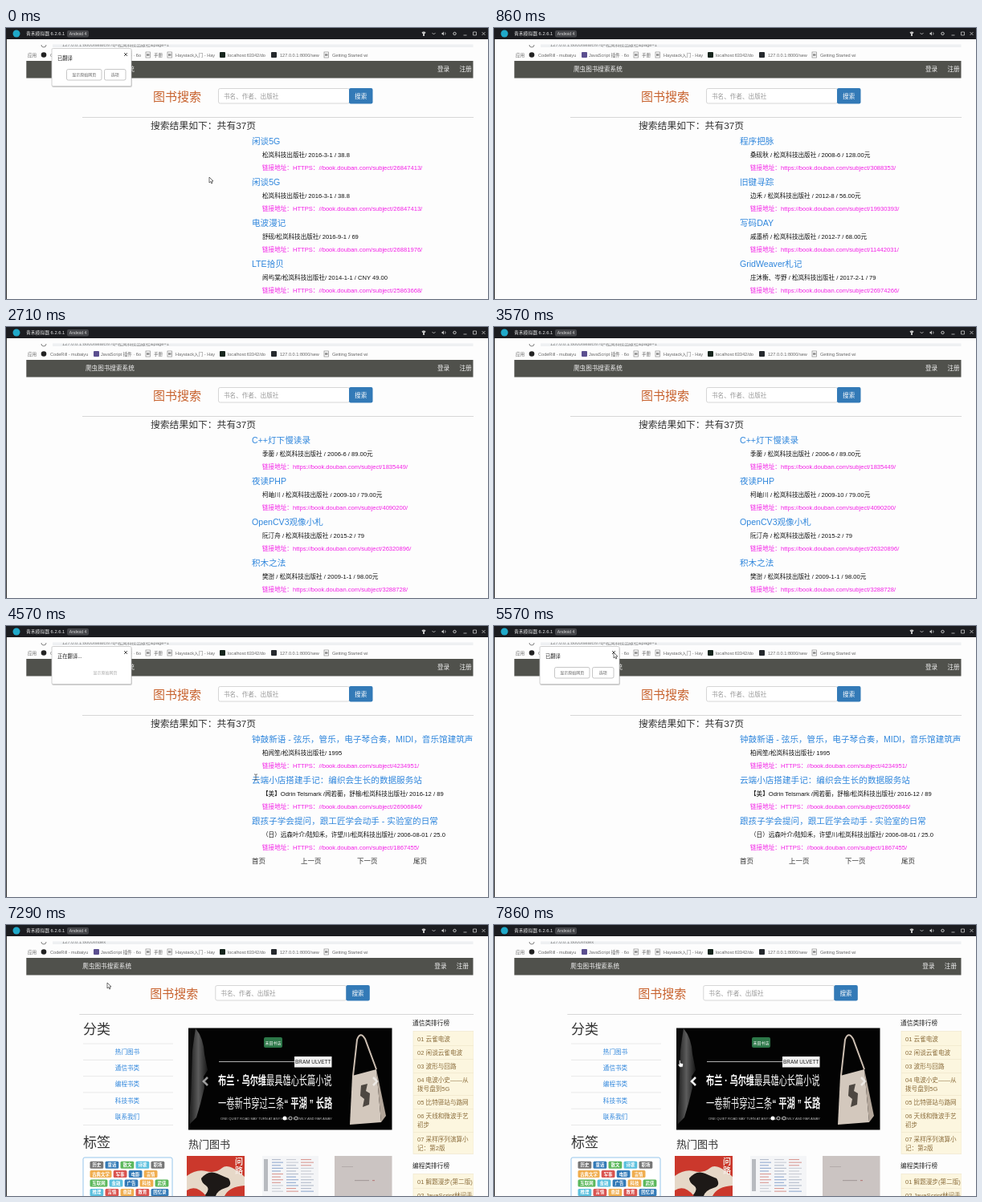
Recreate the animation shown at these times as an HTML page. Size 600 by 338 pixels, loop 8 s.

```html
<!DOCTYPE html>
<html lang="zh-CN">
<head>
<meta charset="utf-8">
<title>图书搜索</title>
<style>
html, body { margin: 0; width: 100%; height: 100%; overflow: hidden; background: #fff; }
svg { display: block; width: 100vw; height: 100vh; }
text { font-family: "Liberation Sans", "Noto Sans CJK SC", "Noto Sans CJK", sans-serif; white-space: pre; }
</style>
</head>
<body>
<svg id="stage" viewBox="0 0 600 338"></svg>
<script>
const PRESS = '松岚科技出版社';
const SITE = 'book.douban.com/subject/';
const NAV = '#50514c', BLUE = '#2f86dc', PINK = '#f31fe6', BROWN = '#8b6d3c';

// Text is placed by its vertical centre.
const text = (x, cy, s, size = 7.6, fill = '#222', more = '') =>
  `<text x="${x}" y="${(cy + size * 0.36).toFixed(2)}" font-size="${size}" fill="${fill}" ${more}>${s}</text>`;
const rect = (x, y, w, h, fill, more = '') =>
  `<rect x="${x}" y="${y}" width="${w}" height="${h}" fill="${fill}" ${more}/>`;
const path = (d, fill = 'none', more = '') => `<path d="${d}" fill="${fill}" ${more}/>`;
const line = (x1, x2, y, stroke = '#e4e4e4') => path(`M${x1} ${y}H${x2}`, 'none', `stroke="${stroke}" stroke-width=".8"`);
const group = (id, body, more = '') => `<g id="${id}" ${more}>${body}</g>`;
const middle = 'text-anchor="middle"';

function titleBar() {
  const icon = 'stroke="#c4c4c4" stroke-width=".8"';
  return rect(0, 0, 600, 14, '#1b1c20') +
    '<circle cx="13" cy="7" r="4.5" fill="#20a9c9"/>' +
    text(25, 7.2, '青禾模拟器 6.2.6.1', 5.8, '#e4e4e4') +
    rect(76, 3, 27, 8.5, '#45464a', 'rx="2"') + text(89.5, 7.3, 'Android 4', 5, '#dcdcdc', middle) +
    path('M517.500 5.500l1.500-1h2l1.500 1-.8 1.500h-.7v3h-2V7h-.7z', '#c4c4c4') +
    path('M530.5 6l2 2 2-2', 'none', icon) +
    path('M542.500 6h1l1.500-1.500v5l-1.500-1.500h-1z', '#c4c4c4') + path('M546.500 5.500q1.200 1.500 0 3', 'none', icon) +
    '<circle cx="558.500" cy="7" r="1.700" fill="none" stroke="#c4c4c4"/>' +
    path('M569.500 9h4M581.500 5h4v4h-4zM592.500 5l4 4M596.500 5l-4 4', 'none', icon);
}

function bookmarks() {
  const doc = x => rect(x, 30, 5.5, 7, '#fff', 'stroke="#888" stroke-width=".7"') +
    rect(x + 1, 32, 3.5, 3, '#9a9a9a');
  const square = (x, fill) => rect(x, 30, 7, 7, fill, 'rx="1"');
  const labels = [[27, '应用'], [55, 'CodeRill - mubaiyu'], [118, 'JavaScript 插件 · 6o'], [184, '手册'],
    [211, 'Haystack入门 - Hay'], [276, 'localhost:63342/do'], [341, '127.0.0.1:8000/sew'], [406, 'Getting Started wi']];
  return '<circle cx="47" cy="33.500" r="3.300" fill="#222"/>' + square(109, '#5b4f8f') +
    doc(174) + doc(201) + square(266, '#16251d') + square(330, '#25292d') + doc(396) +
    labels.map(([x, s]) => text(x, 34, s, 5.6, '#666')).join('');
}

// Address line, cut off along its upper edge.
const address = s => text(70, 20.8, s, 5.8, '#777', 'clip-path="url(#addressClip)"');

const header = () =>
  text(99, 51.3, '爬虫图书搜索系统', 7.6, '#f2f2f2', 'id="brand"') +
  text(537, 51.3, '登录', 7.6, '#f2f2f2') + text(564.5, 51.3, '注册', 7.6, '#f2f2f2') +
  text(183, 86, '图书搜索', 15, '#c8632f') +
  rect(264.5, 75.5, 163, 18.5, '#fff', 'stroke="#ccc" stroke-width=".8" rx="2"') +
  text(271, 85, '书名、作者、出版社', 7.6, '#999') +
  rect(427, 75, 29.5, 19.5, '#337ab7', 'rx="2"') + text(441.7, 85.3, '搜索', 7.6, '#fff', middle);

function results(id, scheme, books) {
  const rows = books.map(([name, info, num], i) => {
    const y = 141 + i * 51;
    return text(306, y, name, 10.6, BLUE) + text(319, y + 17.3, info.replace('@', PRESS), 7.6, '#111') +
      text(319, y + 33, `链接地址：${scheme}//${SITE}${num}/`, 7.6, PINK);
  });
  return group(id, address(`127.0.0.1:8000/search/?q=${PRESS}&amp;page=1`) +
    text(180, 122, '搜索结果如下：共有37页', 11.8, '#333') + rows.join('') +
    (books.length < 4 ? [[306, '首页'], [367, '上一页'], [437, '下一页'], [507, '尾页']]
      .map(([x, s]) => text(x, 293, s, 8.5, '#333')).join('') : ''), 'clip-path="url(#pageClip)"');
}

function bag() {
  return path('M432 188L437 143Q441 132 447 142L461 180', 'none', 'stroke="#cdbfb2" stroke-width="2"') +
    path('M431 188l30-8 6 66-39 3z', '#d3c8bd') + path('M461 180l12 58-6 8z', '#b3a69a') +
    path('M442 200l8-2-2 9 5 3-1 14-8 3 2-10-5-4z', '#4d4741');
}

function banner() {
  return rect(227, 128.5, 253.5, 127, '#030303') +
    path('M228 129h8q10 12 11 32l4 20-5 8 1 14-5 20-5 17-9 9z', 'url(#face)') +
    path('M227 129h9q-2 12-4 28l-2 60-3 30z', '#0b0b0b') +
    rect(321, 140, 23, 13, '#2c7748', 'rx="2"') + text(332.5, 146.7, '禾田书店', 5, '#fff', middle) +
    line(265, 359, 170.5, '#ddd') +
    rect(359, 164, 46.500, 13.500, '#f4f4f4') + text(382.2, 171, 'BRAM ULVETT', 6.4, '#222', middle) +
    // The slogan is set in tall, narrow letters.
    `<g transform="translate(264 0) scale(1 1.5)">` +
    text(0, 129, '布兰 · 乌尔维<tspan font-weight="400">最具雄心长篇小说</tspan>', 10.2, '#fff', 'font-weight="700"') +
    text(0, 148, '一卷新书穿过三条<tspan font-weight="700">“ 平湖 ” 长路</tspan>', 10.3, '#f4f4f4') + '</g>' +
    text(267, 241.5, 'ONE QUIET ROAD MAY TURN AT ANY HOUR, SLOWLY AND FAR AWAY', 4.2, '#bbb') +
    bag() +
    '<circle cx="347" cy="241" r="2.500" fill="#fff"/>' +
    [354, 361].map(x => `<circle cx="${x}" cy="241" r="2" fill="#111" stroke="#fff" stroke-width=".7"/>`).join('') +
    path('M251 190l-5 5 5 5', 'none', 'id="prev" stroke="#fff" stroke-width="2.600"') +
    path('M457 190l5 5-5 5', 'none', 'stroke="#fff" stroke-width="2.600" opacity=".6"');
}

function tags() {
  const [gray, blue, green, cyan, amber, red] = ['#777', '#337ab7', '#5cb85c', '#5bc0de', '#f0ad4e', '#d9534f'];
  const rows = [
    [['历史', gray], ['童话', blue], ['散文', green], ['诗歌', cyan], ['职场', gray]],
    [['古典文学', amber], ['军事', red], ['电影', blue], ['言情', amber]],
    [['互联网', green], ['金融', cyan], ['广告', blue], ['科技', amber], ['武侠', green]],
    [['推理', cyan], ['言情', red], ['悬疑', amber], ['教育', red], ['回忆录', blue]]];
  return rect(96, 290, 111, 60, '#fff', 'stroke="#8cc0ea" stroke-width=".9" rx="2"') +
    rows.map((row, r) => {
      let x = 104.500;
      const y = 294.700 + r * 11.4;
      return row.map(([s, fill]) => {
        const w = 6.6 + s.length * 5.1, at = x;
        x += w + 2.2;
        return rect(at, y, w, 9, fill, 'rx="1.5"') + text(at + w / 2, y + 4.5, s, 5.4, '#fff', middle + ' font-weight="700"');
      }).join('');
    }).join('');
}

function covers() {
  const notes = Array.from({ length: 36 }, (_, i) =>
    rect(331 + (i % 3) * 18, 292 + Math.floor(i / 3) * 3.6, 11 + (i * 7) % 6, 1.1,
      ['#b4bccb', '#c9ccd4', '#d99a94', '#93abd0'][(i * 5 + (i >> 2)) % 4])).join('');
  return rect(225, 288, 72, 50, '#cb382c') +
    path('M225 313q12-9 24-6t20-4 28 11v24h-72z', '#e6d8c8') +
    path('M243 316q9-11 20-6t14 6q6 9-4 12t-12 10h-14q8-9 2-13t-6-9z', '#1d1917') +
    path('M225 331q12-8 24 7h-24zM272 338q6-12 25-13v13z', '#cb382c') +
    ['问', '路'].map((s, i) => text(290, 295 + i * 11, s, 10, '#f3e9e2', middle + ' font-weight="700"')).join('') +
    rect(319, 288, 70, 50, '#f4f5f7') + rect(321, 292, 5, 40, '#8f939c', 'opacity=".6"') + notes +
    rect(409, 288, 71.500, 50, '#cbc4c2') + rect(418, 301, 14, 1, '#b3abaa') +
    rect(434, 318, 18, 1.2, '#a69d9c') + rect(456, 318, 3, 1.2, '#b7807f');
}

function ranking(title, y, h, items) {
  return text(506, y, title, 7.7, '#222') + rect(507, y + 10.500, 75, h, '#fcf6df', 'stroke="#efe7cd" stroke-width=".7"') +
    items.map(([dy, s, rule]) => (rule ? line(507, 582, y + dy - 8.500, '#f1e9cf') : '') +
      text(512, y + dy, s, 7.6, BROWN)).join('');
}

function home() {
  const cats = ['热门图书', '通信书类', '编程书类', '科技书类', '联系我们'];
  return group('home', address('127.0.0.1:8000/index') +
    text(96, 129.5, '分类', 17, '#333') + text(96, 271, '标签', 17, '#333') +
    cats.map((s, i) => line(96, 208, 148 + i * 20.3) + text(151, 158 + i * 20.3, s, 7.6, BLUE, middle)).join('') +
    line(96, 208, 249.5) + tags() + banner() + text(227, 273.5, '热门图书', 13, '#333') + covers() +
    ranking('通信类排行榜', 122, 153, [[20, '01 云雀电波'], [37, '02 闲谈云雀电波', 1], [54, '03 波形与回路', 1],
      [71, '04 电波小史——从', 1], [82, '拨号盘到5G'], [99, '05 比特驿站与路网', 1],
      [116, '06 天线和微波手艺', 1], [127, '初步'], [145, '07 采样序列演算小', 1], [156, '记：第2版']]) +
    ranking('编程类排行榜', 300, 60, [[20, '01 解题漫步(第二版)'], [37, '02 JavaScript林间手', 1]]),
    'clip-path="url(#pageClip)"');
}

function popup() {
  const button = (x, w, s) => rect(x, 51.5, w, 13.5, '#fff', 'stroke="#b8b8b8" stroke-width=".8" rx="2"') +
    text(x + w / 2, 58.500, s, 5, '#666', middle);
  return group('popup',
    rect(57, 27, 100, 47, '#000', 'opacity=".18" rx="2"') +
    rect(57, 25.5, 99, 47, '#fff', 'stroke="#c4c4c4" stroke-width=".8" rx="1.5"') +
    path('M147 31l4 4M151 31l-4 4', 'none', 'stroke="#444" stroke-width=".9"') +
    group('busy', text(64, 37.5, '正在翻译...', 6.3) + text(108.5, 58.500, '显示原始网页', 5, '#aaa')) +
    group('done', text(64, 37.5, '已翻译', 6.3) + button(75.5, 43.5, '显示原始网页') + button(122.5, 26.5, '选项')));
}

function cursors() {
  const edge = 'stroke="#333" stroke-width=".7" stroke-linejoin="round"';
  return group('cursor',
    path('M0 0v7l1.600-1.500 1.200 2.500 1.100-.5L2.800 5H5z', '#fff', 'id="arrow" ' + edge) +
    path('M-.5 0q1-.8 1.500.3V3l3 .8q.8.3.6 1.400L4 8.300H0L-2 5l.8-.6.7.7z', '#fff', 'id="hand" ' + edge) +
    path('M-2-3h1.500l.5.500.500-.500H2M0-2.500v6M-2 4h1.500L0 3.500l.500.500H2', 'none', 'id="beam" stroke="#444" stroke-width=".8"'));
}

const pages = {
  first: ['HTTPS：', [['闲谈5G', '@/ 2016-3-1 / 38.8', 26847413], ['闲谈5G', '@/ 2016-3-1 / 38.8', 26847413],
    ['电波漫记', '舒砚/@/ 2016-9-1 / 69', 26881976], ['LTE拾贝', '闻屿棠/@/ 2014-1-1 / CNY 49.00', 25863668]]],
  second: ['https:', [['程序把脉', '桑砚秋 / @ / 2008-6 / 128.00元', 3088353], ['旧键寻踪', '边禾 / @ / 2012-8 / 56.00元', 19930393],
    ['写码DAY', '戚墨桥 / @ / 2012-7 / 68.00元', 11442031], ['GridWeaver札记', '庄沐衡、岑野 / @ / 2017-2-1 / 79', 26974266]]],
  third: ['https:', [['C++灯下慢读录', '季蘅 / @ / 2006-6 / 89.00元', 1835449], ['夜读PHP', '柯岫川 / @ / 2009-10 / 79.00元', 4090200],
    ['OpenCV3观像小札', '阮汀舟 / @ / 2015-2 / 79', 26320896], ['积木之法', '樊澍 / @ / 2009-1-1 / 98.00元', 3288728]]],
  last: ['HTTPS：', [['钟鼓新语 - 弦乐，管乐，电子琴合奏，MIDI，音乐馆建筑声', '柏闻笙/@/ 1995', 4234951],
    ['云端小店搭建手记：编织会生长的数据服务站', '【美】Odrin Telsmark /闻若蘅，舒榆/@/ 2016-12 / 89', 26906846],
    ['跟孩子学会提问，跟工匠学会动手 - 实验室的日常', '（日）远森叶介/陆知禾，许望川/@/ 2006-08-01 / 25.0', 1867455]]]
};

document.getElementById('stage').innerHTML =
  `<defs><clipPath id="pageClip">${rect(25, 14, 557, 324, '#000')}</clipPath>
  <clipPath id="addressClip">${rect(40, 20.5, 250, 4, '#000')}</clipPath>
  <linearGradient id="face"><stop stop-color="#1a1a1a"/><stop offset=".5" stop-color="#5c5c5c"/><stop offset="1" stop-color="#161616"/></linearGradient></defs>` +
  rect(0, 0, 600, 338, '#fdfdfd') + rect(0, 14, 1, 324, '#333') + titleBar() +
  rect(58, 20.5, 523.5, 3.5, '#eef0f2') +
  path('M44 21a3 3 0 0 0 6 0', 'none', 'stroke="#777" stroke-width=".9"') +
  bookmarks() + rect(25.3, 41, 556.2, 21.5, NAV) + group('header', header()) +
  `<g clip-path="url(#pageClip)">${group('rule', line(95, 590, 111.5, '#cfcfcf'))}</g>` +
  Object.entries(pages).map(([id, [scheme, books]]) => results(id, scheme, books)).join('') +
  home() + popup() + cursors();

const $ = id => document.getElementById(id);
const show = (id, on) => $(id).setAttribute('display', on ? 'inline' : 'none');

// All times below are in steps of 1/7 second.
const LOOP = 8000, STEPS = 56;
const schedule = [['first', 0], ['second', 6], ['third', 18], ['last', 29], ['home', 48]];
const track = [[0, 253, 186], [28, 253, 186], [29, 311, 188], [34, 311, 188], [38, 149, 33], [40, 149, 33],
  [44, 155, 47], [47, 155, 47], [50, 126, 72], [51, 126, 72], [54, 231, 169], [56, 231, 169]];

function pointer(n) {
  const i = Math.max(1, track.findIndex(k => k[0] >= n));
  const [a, b] = [track[i - 1], track[i]];
  const u = (n - a[0]) / (b[0] - a[0]), e = u * u * (3 - 2 * u);
  return [a[1] + (b[1] - a[1]) * e, a[2] + (b[2] - a[2]) * e];
}

function draw(ms) {
  const n = Math.floor(ms % LOOP / LOOP * STEPS);
  const page = schedule.filter(s => s[1] <= n).pop()[0], atHome = page === 'home';
  schedule.forEach(([id]) => show(id, id === page));
  ['header', 'rule'].forEach(id => $(id).setAttribute('transform', `translate(${atHome ? -3.7 : 0} 0)`));

  show('popup', n < 5 || (n >= 30 && n < 40));
  show('busy', n >= 30 && n < 34);
  show('done', n < 5 || n >= 34);

  const [x, y] = pointer(n);
  const overBrand = n >= 42 && n < 48, overBanner = atHome && x > 228 && y > 129;
  const kind = overBrand || overBanner ? 'hand' : n >= 29 && n < 35 ? 'beam' : 'arrow';
  ['arrow', 'hand', 'beam'].forEach(id => show(id, id === kind));
  show('cursor', n < 6 || n >= 29);
  $('cursor').setAttribute('transform', `translate(${x.toFixed(1)} ${y.toFixed(1)})`);
  $('brand').setAttribute('fill', overBrand ? NAV : '#f2f2f2');
  $('prev').setAttribute('opacity', overBanner ? 0.95 : 0.6);
}

const start = performance.now();
function tick() {
  draw(performance.now() - start);
  requestAnimationFrame(tick);
}
tick();
</script>
</body>
</html>
```
